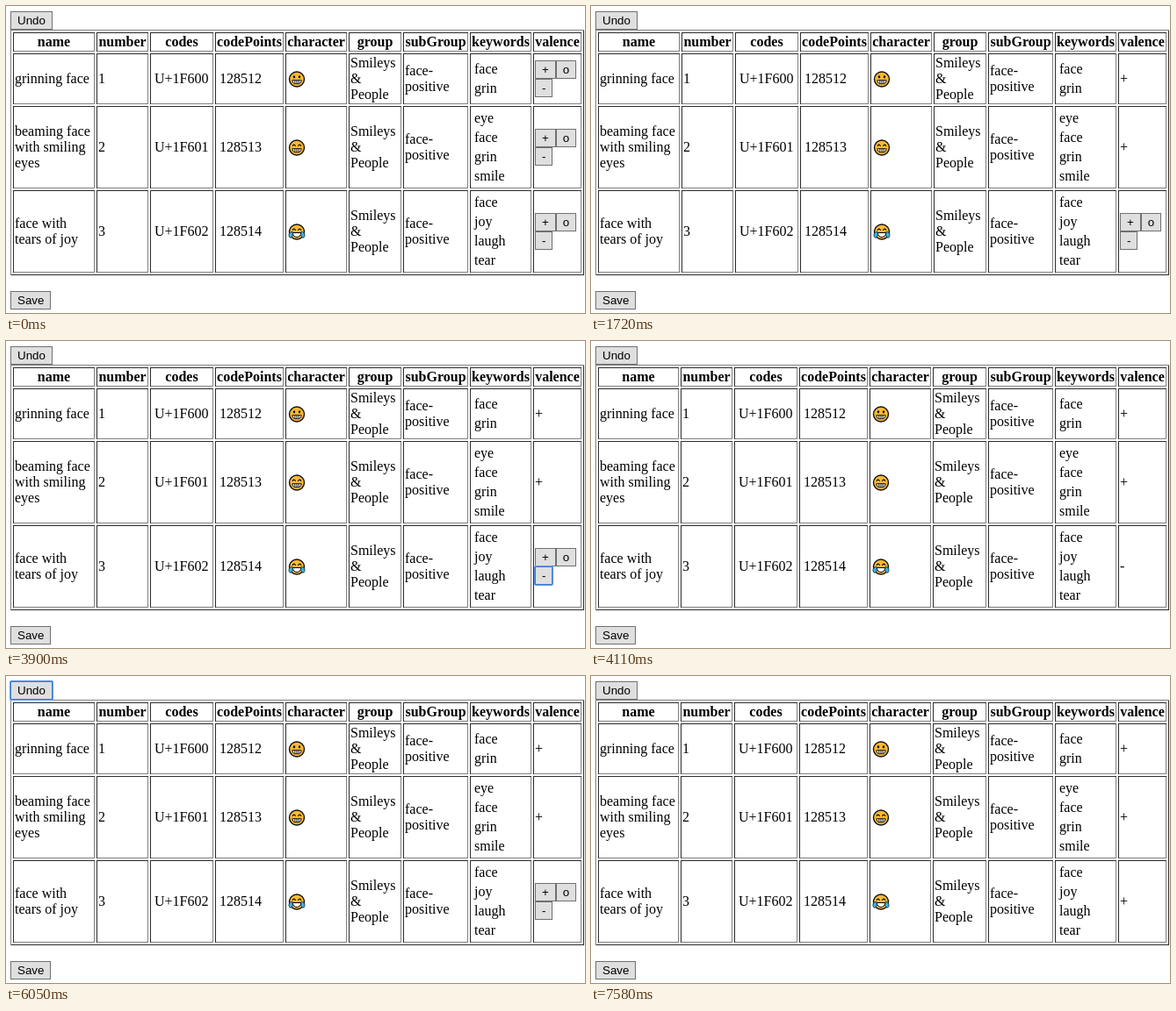
Write an HTML page that moves like this. It is 659x350 px and loops after 8000 ms.

```html
<!DOCTYPE html>
<html lang="en">
<head>
<meta charset="utf-8">
<title>Emoji valence table</title>
<style>
html, body { margin: 0; width: 100%; height: 100%; overflow: hidden; background: #fff; }
svg { display: block; }
text { font: 16px "Liberation Serif", "Times New Roman", serif; fill: #000; white-space: pre; }
.head { font-weight: bold; text-anchor: middle; }
.label { font: 13.333px "Liberation Sans", Arial, sans-serif; }
</style>
</head>
<body>
<svg id="stage" width="659" height="350" viewBox="0 0 659 350"></svg>
<script>
const LOOP = 8000;
const DARK = '#2c2c2c', GRAY = '#808080';
const HEADERS = ['name', 'number', 'codes', 'codePoints', 'character', 'group', 'subGroup', 'keywords', 'valence'];
const WIDE = [8, 103, 164, 238, 318, 390, 452, 528, 600];
const ENDS = [450, 526, 598, 655];
const ROWS = [
  { top: 54, bottom: 112, name: ['grinning face'], keywords: ['face', 'grin'] },
  { top: 114, bottom: 208, name: ['beaming face', 'with smiling', 'eyes'], keywords: ['eye', 'face', 'grin', 'smile'] },
  { top: 210, bottom: 304, name: ['face with', 'tears of joy'], keywords: ['face', 'joy', 'laugh', 'tear'] }
];

// Each step: start time, valence per row, focused button, muted focus ring.
const STEPS = [
  [0, '   '],
  [210, '   ', 'undo'],
  [640, '   ', '0+', true],
  [1080, '+  '],
  [1510, '+  ', '1+'],
  [1720, '++ '],
  [2590, '++ ', '2+'],
  [3030, '++ ', '2o'],
  [3900, '++ ', '2-'],
  [4110, '++-'],
  [4750, '++-', 'save'],
  [4970, '++-'],
  [5400, '++-', 'undo'],
  [6050, '++ ', 'undo'],
  [6480, '++ ', '2+', true],
  [7580, '+++']
];

const text = (x, y, s, cls = '') => `<text x="${x}" y="${y}" class="${cls}">${s}</text>`;

const lines = (x, middle, list, pitch = 18) =>
  list.map((s, i) => text(x, middle + 5 + (i - (list.length - 1) / 2) * pitch, s)).join('');

const rect = (x, y, w, h, fill) =>
  `<rect x="${x}" y="${y}" width="${w}" height="${h}" fill="${fill}" shape-rendering="crispEdges"/>`;

function bevel(x, y, right, bottom, lit, shade) {
  const w = right - x, h = bottom - y;
  return rect(x, bottom - 1, w, 1, shade) + rect(right - 1, y, 1, h, shade) +
    rect(x, y, w, 1, lit) + rect(x, y, 1, h, lit);
}

function button(x, y, w, label, focused, muted) {
  const edge = focused ? (muted ? '#444' : '#4a78c0') : '#707070';
  const px = Math.round(x), pw = Math.round(x + w) - px;
  const ring = focused
    ? `<rect x="${px - .5}" y="${y - .5}" width="${pw + 1}" height="22" rx="1.5" fill="none" stroke="${muted ? '#808080' : '#5b9bf0'}"/>`
    : '';
  return `<rect x="${px + .5}" y="${y + .5}" width="${pw - 1}" height="20" fill="#dfdfdf" stroke="${edge}"/>` +
    ring + text(x + 8, y + 15, label, 'label');
}

function emoji(x, y, kind) {
  const eyes = kind === 0
    ? '<ellipse cx="-3" cy="-2.7" rx="1.2" ry="1.6"/><ellipse cx="3" cy="-2.7" rx="1.2" ry="1.6"/>'
    : '<path d="M-5-1.8Q-3.2-5-1.4-1.8M1.4-1.8Q3.2-5 5-1.8" fill="none" stroke="#000" stroke-width="1.1"/>';
  const mouth = kind === 2
    ? '<path d="M-4.8 1H4.8Q4 6 0 6T-4.8 1Z" fill="#fff" stroke="#000"/>'
    : '<path d="M-5.2 1.2H5.2Q4.6 5.2 2.4 5.2H-2.4Q-4.6 5.2-5.2 1.2ZM-2.2 1.2V5M0 1.2V5M2.2 1.2V5" fill="#fff" stroke="#000" stroke-width=".9"/>';
  const tear = '<path d="M-4.8 0Q-9.5 0-9 4.6Q-8.3 7.8-5.8 6.3Q-4.2 4.8-4.8 0Z" fill="#35b8e8" stroke="#123" stroke-width=".8"/>';
  const tears = kind === 2 ? tear + `<g transform="scale(-1 1)">${tear}</g>` : '';
  return `<g transform="translate(${x} ${y})"><circle r="8.5" fill="#fbb935" stroke="#111" stroke-width="1.4"/>${eyes}${mouth}${tears}</g>`;
}

function valence(row, index, value, focus, muted) {
  const mid = (row.top + row.bottom) / 2;
  if (value !== ' ') return text(602, mid + 5, value);
  const specs = [['+', 602, -21, 23.8], ['o', 625.8, -21, 23.4], ['-', 602, 0, 20.4]];
  // The focused button goes last so its ring stays on top.
  return specs.map(([s, x, dy, w]) => [focus === index + s, button(x, mid + dy, w, s, focus === index + s, muted)])
    .sort((a, b) => a[0] - b[0]).map(b => b[1]).join('');
}

function draw([, values, focus, muted]) {
  const compact = !values.includes(' ');
  // Without buttons the group column takes one pixel from the name column.
  const starts = WIDE.map((x, i) => compact && i > 0 && i < 6 ? x - 1 : x);
  const ends = starts.map((_, i) => i < 5 ? starts[i + 1] - 2 : ENDS[i - 5]);
  let out = rect(0, 0, 659, 350, '#fff') + bevel(5, 27, 658, 307, GRAY, DARK);

  HEADERS.forEach((title, i) => {
    out += bevel(starts[i], 30, ends[i], 52, DARK, GRAY);
    out += text((starts[i] + ends[i]) / 2, 46, title, 'head');
  });

  ROWS.forEach((row, r) => {
    const mid = (row.top + row.bottom) / 2;
    starts.forEach((x, i) => { out += bevel(x, row.top, ends[i], row.bottom, DARK, GRAY); });
    out += lines(starts[0] + 2, mid, row.name) +
      lines(starts[1] + 2, mid, [r + 1]) +
      lines(starts[2] + 5, mid, ['U+1F60' + r]) +
      lines(starts[3] + 5, mid, [128512 + r]) +
      emoji(starts[4] + 13, mid + .5, r) +
      lines(starts[5] + 2, mid, ['Smileys', '&amp;', 'People']) +
      lines(starts[6] + 2, mid, ['face-', 'positive']) +
      lines(starts[7] + 5, mid, row.keywords, 22) +
      valence(row, r, values[r], focus, muted);
  });

  out += button(5, 6, 47.9, 'Undo', focus === 'undo', muted);
  out += button(5, 325, 46, 'Save', focus === 'save', muted);
  return out;
}

const stage = document.getElementById('stage');
const began = performance.now();
let shown = null;

function update() {
  const t = (performance.now() - began) % LOOP;
  const step = STEPS.filter(s => s[0] <= t).pop();
  if (step !== shown) {
    stage.innerHTML = draw(step);
    shown = step;
  }
  requestAnimationFrame(update);
}
update();
</script>
</body>
</html>
```
